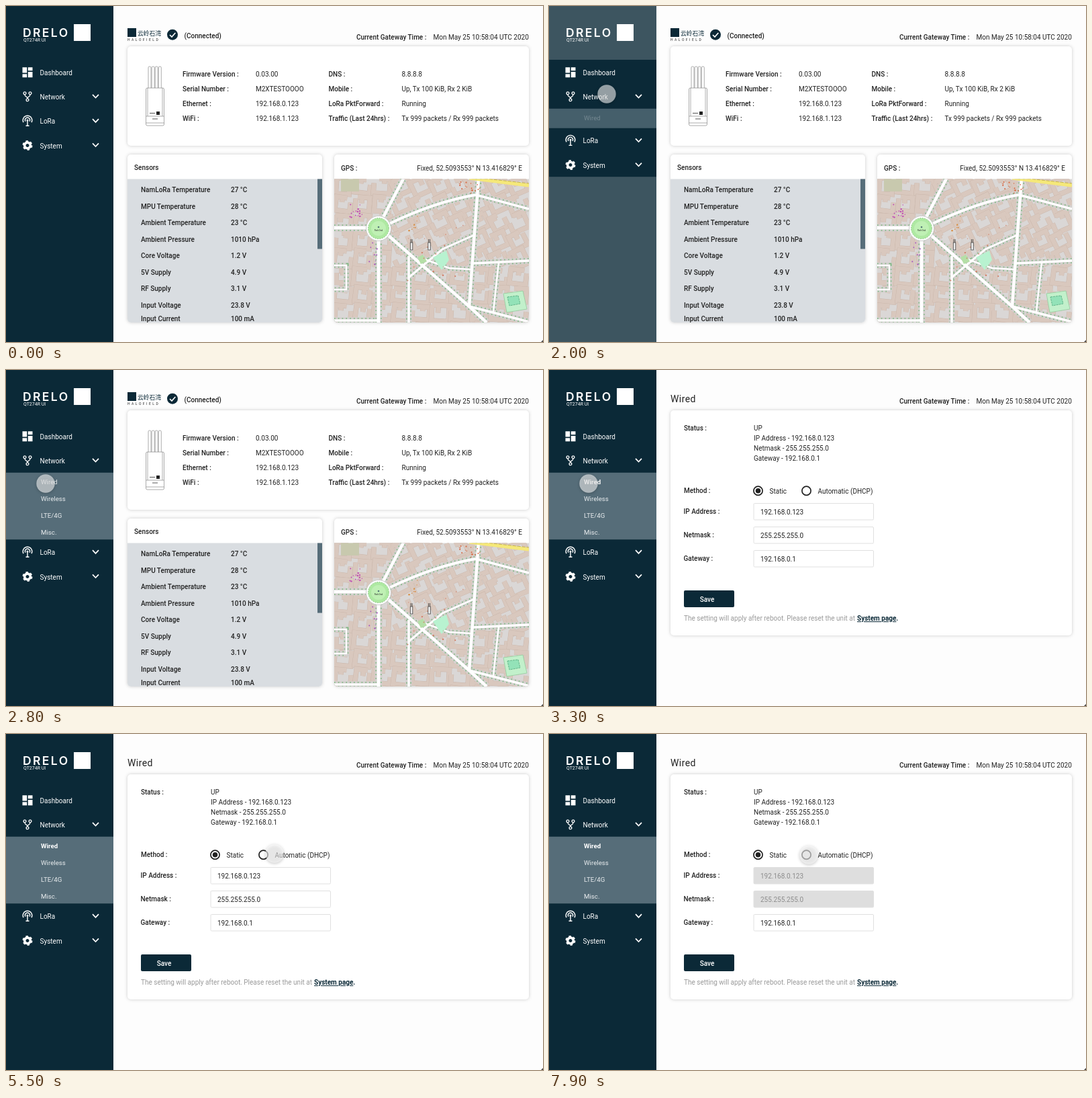
Write an HTML page that moves like this. It is 800x500 px and loops after 8 s.

```html
<!DOCTYPE html>
<html lang="en">
<head>
<meta charset="utf-8">
<title>Gateway settings</title>
<style>
html, body { margin: 0; width: 100%; height: 100%; overflow: hidden; background: #fdfdfd; }
svg { display: block; width: 800px; height: 500px; font: 10px Roboto, sans-serif; }
.card { fill: #fff; filter: drop-shadow(0 0 2.5px #0003); }
</style>
</head>
<body>
<svg id="stage" viewBox="0 0 800 500"></svg>
<script>
const NAVY = '#0b2937', SLATE = '#566d79', INK = '#222';
const stage = document.getElementById('stage');

// y is the middle of the capitals
const text = (x, y, s, o = '') => `<text x="${x}" y="${y + 3.9}" fill="${INK}" ${o}>${s}</text>`;
const label = (x, y, s, o = '') => text(x, y, s, `font-weight="500" ${o}`);
const rect = (x, y, w, h, o = '') => `<rect x="${x}" y="${y}" width="${w}" height="${h}" ${o}/>`;
const circle = (x, y, r, o = '') => `<circle cx="${x}" cy="${y}" r="${r}" ${o}/>`;
const path = (d, o = '') => `<path d="${d}" ${o}/>`;
const card = (y, h, x = 181, w = 598) => rect(x, y, w, h, 'rx="5" class="card"');
const white = 'style="fill:#fff"';
const line = (color, w) => `fill="none" stroke="${color}" stroke-width="${w}"`;

let seed = 7;
const rnd = () => (seed = seed * 16807 % 2147483647) / 2147483647;

function streetMap() {
  let s = rect(489, 257, 290, 214, 'fill="#dad7d6"');
  // rows of houses bent around a courtyard
  for (let y = 268; y < 485; y += 27) for (let x = 502; x < 790; x += 29) {
    const w = 10 + rnd() * 3, h = 9 + rnd() * 3, gap = rnd() * 9, tilt = (x > 570 && y < 380 ? -27 : 3) + rnd() * 5;
    const d = `M${-w + gap} ${-h}H${w}V${h}H${-w}V${-h + gap}M${gap - 4} ${-h}V${-gap / 2}`;
    const bend = rnd() < .5 ? 1 : -1;
    s += `<g transform="translate(${x} ${y}) rotate(${tilt}) scale(${bend} 1)">`
      + path(d, line('#c9b5a9', 7.6)) + path(d, line('#d9c8be', 6.8)) + '</g>';
  }
  s += rect(499, 257, 27, 19, 'fill="#c8c9ae"');
  const roads = [
    ['M489 330H540', 5], ['M561 316L592 257', 4.5], ['M571 324Q640 291 700 281', 4],
    ['M555 348V471', 5], ['M569 341L690 447L716 471', 4.5], ['M600 372V471', 3.5],
    ['M704 257L697 350L690 447', 4.5], ['M696 383L779 379', 3.5], ['M600 404L650 362L697 341', 3],
    ['M690 447L779 470', 3.5], ['M700 281L779 302', 3.5], ['M489 386H507V422H489', 2.5],
    ['M734 381L726 455', 2.5], ['M489 468H555', 3.5], ['M621 376L660 390L692 392', 2.5]
  ];
  for (const [d, w] of roads) s += path(d, line('#d3d0ce', w + 6));
  for (const [d, w] of roads) s += path(d, line('#82b884', w + 4.5) + ' stroke-dasharray="1.6 4.2"');
  for (const [d, w] of roads) s += path(d, line('#c9c6c3', w + .8));
  for (const [d, w] of roads) s += path(d, line('#fff', w));
  s += path('M690 256L779 267', line('#f5e879', 5)) + path('M706 256L779 264', line('#c7b54d', 1) + ' stroke-dasharray="5 2"');
  s += path('M636 374L656 364L660 378L649 393Z', 'fill="#b8f2d0"')
    + path('M613 374L621 370L627 380L618 384Z', 'fill="#b5dfa7"')
    + path('M741 428L770 424L776 451L746 456Z', 'fill="#c2f0cb" stroke="#8ccb98" stroke-width=".7"')
    + path('M747 433L763 431L766 443L750 446Z', 'fill="#93e2b8" stroke="#64b58b" stroke-dasharray="3 1"');
  s += circle(555, 331, 18.5, 'fill="#fff" stroke="#ccc"') + circle(555, 331, 15.5, 'fill="#aee9a2" stroke="#88bd82" stroke-dasharray="1.5 2"')
    + circle(555, 331, 11, 'fill="#bff0b4"') + circle(555, 329, 1.3, 'fill="#577"')
    + text(555, 334, 'Park Oval', 'font-size="3" text-anchor="middle" dy="-2.7"');
  const spots = [[520, 306, 22, 22, 16, '#c04fb5'], [690, 270, 36, 18, 16, '#d9663f'], [604, 325, 18, 26, 8, '#d78b3e'],
    [547, 368, 12, 34, 9, '#a85ac0'], [640, 365, 90, 90, 16, '#d47f68']];
  for (const [x, y, w, h, n, color] of spots) for (let i = 0; i < n; i++)
    s += circle(x + (rnd() - .5) * w, y + (rnd() - .5) * h, .6 + rnd() * .7, `fill="${color}"`);
  for (const x of [604, 630.5])
    s += rect(x - 1.7, 352, 3.5, 11, 'fill="#eee" stroke="#444" stroke-width=".8"') + path(`M${x - 1} 352v-5M${x + 1} 352v-5`, line('#444', .9));
  return `<clipPath id="mapClip">${path('M489 257.5H779V466a5 5 0 0 1-5 5H494a5 5 0 0 1-5-5Z')}</clipPath><g clip-path="url(#mapClip)">${s}</g>`;
}

function device() {
  let s = '';
  for (let i = 0; i < 4; i++) s += rect(212 + i * 5.1, 90, 4, 34, 'rx="1.8"');
  s += rect(208.5, 122, 27, 56, 'rx="2"') + path('M208.5 164H235.5M211 122V164M233 122V164M208.5 174H235.5');
  return `<g fill="#fff" stroke="#888" stroke-width=".7">${s}</g>`
    + rect(224, 157, 5, 5, `fill="${INK}"`) + path('M214 159.5H222M218 168H226', line('#555', 1));
}

function dashboard() {
  const left = [['Firmware Version :', '0.03.00'], ['Serial Number :', 'M2XTESTOOOO'], ['Ethernet :', '192.168.0.123'], ['WiFi :', '192.168.1.123']];
  const right = [['DNS :', '8.8.8.8'], ['Mobile :', 'Up, Tx 100 KiB, Rx 2 KiB'], ['LoRa PktForward :', 'Running'],
    ['Traffic (Last 24hrs) :', 'Tx 999 packets / Rx 999 packets']];
  const sensors = [['NamLoRa Temperature', '27 °C'], ['MPU Temperature', '28 °C'], ['Ambient Temperature', '23 °C'], ['Ambient Pressure', '1010 hPa'],
    ['Core Voltage', '1.2 V'], ['5V Supply', '4.9 V'], ['RF Supply', '3.1 V'], ['Input Voltage', '23.8 V'], ['Input Current', '100 mA']];
  const info = (rows, x1, x2) => rows.map(([k, v], i) => label(x1, 101.5 + i * 22, k) + text(x2, 101.5 + i * 22, v)).join('');
  return rect(181, 33, 13, 13, `fill="${NAVY}"`)
    + text(196, 40, '云岭石湾', `font-size="8.8" style="fill:${NAVY};font-family:'Noto Sans CJK SC','Noto Sans CJK',sans-serif"`)
    + text(181, 48, 'HALOFIELD', 'font-size="5" letter-spacing="2.5"')
    + circle(248, 42.7, 8, `fill="${NAVY}"`) + path('M244 43L247 46L252.3 40', line('#fff', 1.7))
    + label(265.5, 44.5, '(Connected)')
    + card(60, 148) + device() + info(left, 263, 372) + info(right, 480.5, 589.5)
    + card(221, 250, 181, 290) + label(191, 240, 'Sensors')
    + path('M181 257.5H471V466a5 5 0 0 1-5 5H186a5 5 0 0 1-5-5Z', 'fill="#d9dde1"') + rect(464, 257.5, 7, 104, `fill="${SLATE}"`)
    + sensors.map(([k, v], i) => { const y = i < 8 ? 273.5 + i * 24.5 : 465.5; return label(201, y, k) + label(335, y, v); }).join('')
    + card(221, 250, 489, 290) + label(499, 241, 'GPS :') + text(769, 241, 'Fixed, 52.5093553° N 13.416829° E', 'text-anchor="end"')
    + streetMap();
}

function wiredPage() {
  const status = ['UP', 'IP Address - 192.168.0.123', 'Netmask - 255.255.255.0', 'Gateway - 192.168.0.1'];
  const fields = [['IP Address :', '192.168.0.123'], ['Netmask :', '255.255.255.0'], ['Gateway :', '192.168.0.1']];
  return text(181, 42.3, 'Wired', 'font-size="14" letter-spacing=".4" dy="1.4"') + card(60, 335) + label(201, 86.5, 'Status :')
    + status.map((s, i) => text(305, 86.5 + i * 15, s)).join('')
    + label(201, 179.5, 'Method :')
    + [311.5, 383.5].map(x => circle(x, 179.7, 6.6, line(INK, 1.7))).join('') + circle(311.5, 179.7, 3.8, `fill="${INK}"`)
    + text(328.5, 179.7, 'Static') + text(400.5, 179.7, 'Automatic (DHCP)')
    + fields.map(([k, v], i) => {
      const y = 198.5 + i * 35;
      return label(200.5, y + 12, k) + `<g class="field">${rect(305, y, 178.5, 24.5, 'rx="1.5" fill="#fff" stroke="#e0e0e0"')}${text(315, y + 12.3, v)}</g>`;
    }).join('')
    + rect(201, 328, 75, 25, `rx="2" fill="${NAVY}"`) + label(235.5, 341.3, 'Save', `text-anchor="middle" ${white}`)
    + text(201, 369.2, 'The setting will apply after reboot. Please reset the unit at', 'style="fill:#999"')
    + text(459, 369.2, '<tspan text-decoration="underline">System page</tspan>.', `font-weight="700" style="fill:${NAVY}"`);
}

const icons = {
  Dashboard: path('M-7.5.8h6.7V-7.5h-6.7ZM-7.5 7.5h6.7v-5h-6.7ZM.8 7.5h6.7V-.8H.8ZM.8-7.5v5h6.7v-5Z', 'fill="#fff"'),
  Network: `<g ${line('#fff', 1.3)}>${circle(-4, -5, 1.9) + circle(4, -5, 1.9) + circle(0, 5, 1.9) + path('M-4-3C-4 1 0-1 0 3M4-3C4 1 0-1 0 3')}</g>`,
  LoRa: `<g ${line('#fff', 1.4)}>${path('M-6 2A6.8 6.8 0 1 1 6 2M-3 .5A3.6 3.6 0 1 1 3 .5M0-1V7M-2.5 7H2.5') + circle(0, -1.3, .8)}</g>`,
  System: circle(0, 0, 4.3, line('#fff', 3.6)) + circle(0, 0, 6.4, line('#fff', 2.2) + ' stroke-dasharray="3.35"')
};
function navItem(name, y) {
  const arrow = name === 'Dashboard' ? '' : path(`M129 ${y - 3}L133.5 ${y + 1.7}L138 ${y - 3}`, line('#fff', 1.7));
  return `<g transform="translate(32 ${y})">${icons[name]}</g>` + text(50.5, y + .2, name, white) + arrow;
}
const subItems = ['Wired', 'Wireless', 'LTE/4G', 'Misc.'];

stage.innerHTML = rect(0, 0, 800, 500, 'fill="#fdfdfd"')
  + `<g id="dash">${dashboard()}</g><g id="wired">${wiredPage()}</g>`
  + label(522, 46, 'Current Gateway Time :') + text(636.5, 46, 'Mon May 25 10:58:04 UTC 2020')
  + path('M800 497l-3 3h3Z', 'fill="#444"')
  + rect(0, 0, 160, 500, `id="side" fill="${NAVY}"`) + rect(0, 80, 160, 145, `id="nav" fill="${NAVY}"`)
  + text(25, 40, 'DRELO', `font-size="17.5" font-weight="600" letter-spacing="2.4" dy="2.3" style="fill:#fff;font-family:Inter,sans-serif"`)
  + rect(101, 27, 25, 25, 'fill="#fff"') + text(26, 49, 'QT274R UI', `font-size="7" ${white}`)
  + navItem('Dashboard', 98.7) + navItem('Network', 134.8)
  + `<clipPath id="fold">${rect(0, 152.5, 160, 0, 'id="foldBox"')}</clipPath><g clip-path="url(#fold)">`
  + rect(0, 152.5, 160, 100, `id="shade" fill="${SLATE}"`) + '<g id="sub">'
  + subItems.map((s, i) => text(52, 166 + i * 25, s, `font-size="9.7" style="fill:#e8ecee" ${i ? '' : 'id="current"'}`)).join('') + '</g></g>'
  + `<g id="lower">${navItem('LoRa', 171.2) + navItem('System', 207.4)}</g>`
  + `<g id="cursor" style="filter:drop-shadow(0 1px 2px #0006)">${circle(0, 0, 13.7, 'fill="#fff" fill-opacity=".57"')}</g>`;

const $ = id => document.getElementById(id);
const set = (id, name, value) => $(id).setAttribute(name, value);
const clamp = v => Math.max(0, Math.min(1, v));
const ease = v => (v = clamp(v), v * v * (3 - 2 * v));

// time, x, y
const route = [[1200, 300, 250], [1700, 86, 131], [2300, 86, 131], [2700, 59, 169], [3300, 59, 169], [3900, 294, 208],
  [4250, 500, 357], [4550, 445, 344], [5000, 268, 300], [5450, 400, 178], [5800, 400, 178], [6300, 180, 224],
  [6600, 86, 196], [6700, 86, 196], [7000, 250, 172], [7300, 397, 181], [7600, 397, 181], [7900, 387, 180]];
function cursorAt(t) {
  const i = route.findIndex(p => p[0] > t);
  if (i < 0) return route.at(-1).slice(1);
  const b = route[i], a = route[i - 1] || b;
  const k = a === b ? 0 : ease((t - a[0]) / (b[0] - a[0]));
  return [a[1] + (b[1] - a[1]) * k, a[2] + (b[2] - a[2]) * k];
}

function draw(t) {
  const open = ease((t - 1900) / 280), page = ease((t - 3000) / 300);
  set('side', 'fill-opacity', 1 - open * (1 - open));
  set('nav', 'height', 145 + 100 * open);
  set('foldBox', 'height', 100 * open);
  set('shade', 'opacity', .7 + .3 * open);
  set('sub', 'opacity', open);
  set('lower', 'transform', `translate(0 ${100 * open})`);
  set('dash', 'opacity', 1 - page);
  set('wired', 'opacity', page);
  set('current', 'font-weight', page > .5 ? 700 : 400);
  $('current').style.fill = page > .5 ? '#fff' : '#e8ecee';
  document.querySelectorAll('.field').forEach((f, i) => {
    const off = i < 2 && t >= 7700 + i * 100;
    f.firstChild.setAttribute('fill', off ? '#dedede' : '#fff');
    f.lastChild.setAttribute('fill', off ? '#8c8c8c' : INK);
  });
  set('cursor', 'transform', `translate(${cursorAt(t)})`);
  set('cursor', 'opacity', clamp((t - 1200) / 300));
}

const start = performance.now();
function tick() {
  const t = (performance.now() - start) % 8000;
  draw(Math.floor(t / 100) * 100);
  requestAnimationFrame(tick);
}
tick();
</script>
</body>
</html>
```
